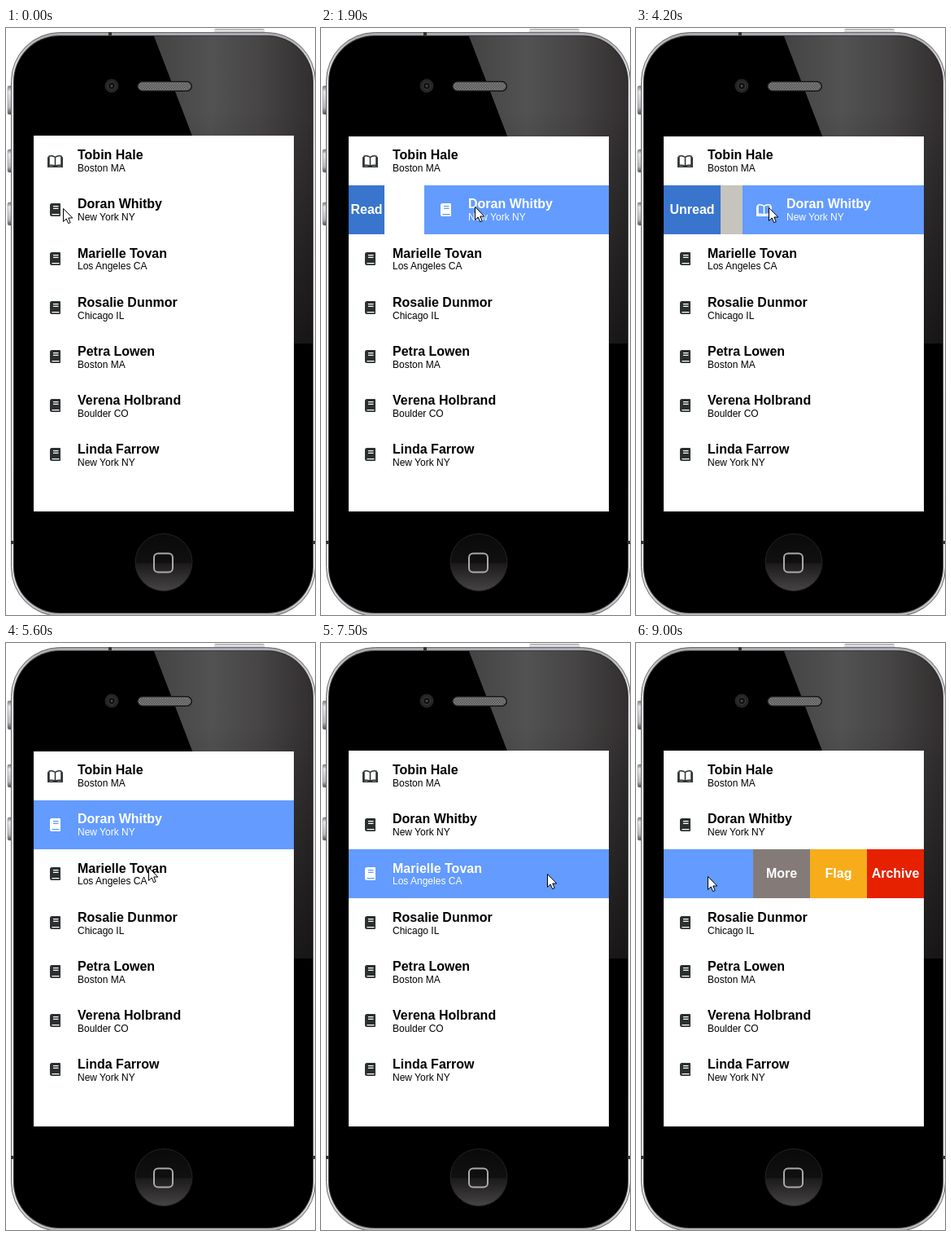
Recreate the animation shown at these times as an HTML page. Size 380 by 720 pixels, loop 9700 ms.

```html
<!DOCTYPE html>
<html lang="en">
<head>
<meta charset="utf-8">
<title>Swipe list</title>
<style>
  html, body { margin: 0; width: 100%; height: 100%; overflow: hidden; background: #fff; }
  svg { display: block; }
  text { font-family: "Liberation Sans", Arial, sans-serif; }
  .name, .label { font-size: 16px; font-weight: bold; }
  .city { font-size: 12px; }
  .label { fill: #fff; text-anchor: middle; }
  .row { --bg: #fff; --ink: #000; --icon: #2b3031; }
  .row rect { fill: var(--bg); }
  .row text { fill: var(--ink); }
  .closed { fill: var(--icon); fill-rule: evenodd; }
  .open { fill: none; stroke: var(--icon); stroke-width: 1.5; }
</style>
</head>
<body>
<svg width="380" height="720" viewBox="0 0 380 720">
  <defs>
    <linearGradient id="rim" x1="0" x2="0" y1="0" y2="1">
      <stop offset="0" stop-color="#a9a8ac"/><stop offset=".06" stop-color="#dcdbdf"/>
      <stop offset=".5" stop-color="#efeef1"/><stop offset=".94" stop-color="#e2e1e5"/>
      <stop offset="1" stop-color="#b5b4b8"/>
    </linearGradient>
    <linearGradient id="key" x1="0" x2="0" y1="0" y2="1">
      <stop offset="0" stop-color="#77777b"/><stop offset=".2" stop-color="#e6e6e9"/>
      <stop offset=".75" stop-color="#b9b9bd"/><stop offset="1" stop-color="#4b4b4f"/>
    </linearGradient>
    <linearGradient id="gloss" gradientUnits="userSpaceOnUse" x1="185" y1="0" x2="378" y2="0">
      <stop offset="0" stop-color="#444"/><stop offset=".35" stop-color="#525252"/>
      <stop offset=".65" stop-color="#474545"/><stop offset="1" stop-color="#322e2f"/>
    </linearGradient>
    <linearGradient id="fade" gradientUnits="userSpaceOnUse" x1="0" y1="100" x2="0" y2="387">
      <stop offset="0" stop-opacity="0"/><stop offset="1" stop-opacity=".55"/>
    </linearGradient>
    <linearGradient id="home" x1="0" x2="0" y1="0" y2="1">
      <stop offset="0" stop-color="#0a0a0a"/><stop offset=".5" stop-color="#101010"/>
      <stop offset=".52" stop-color="#1c1a1b"/><stop offset="1" stop-color="#474446"/>
    </linearGradient>
    <pattern id="mesh" width="3" height="3" patternUnits="userSpaceOnUse">
      <rect width="3" height="3" fill="#858585"/>
      <path d="M0 0h1.5v1.5h-1.5zM1.5 1.5h1.5v1.5h-1.5z" fill="#4f4f4f"/>
    </pattern>
    <clipPath id="face"><rect x="10" y="10" width="367" height="707" rx="56"/></clipPath>
    <clipPath id="screen"><rect x="34" y="132" width="320" height="461"/></clipPath>
  </defs>

  <g id="phone">
    <rect x="256" y="1" width="62" height="8" rx="2" fill="url(#key)"/>
    <g fill="url(#key)" stroke="#8b8b90" stroke-width=".6">
      <rect x="2" y="71" width="7" height="35" rx="2"/>
      <rect x="2" y="149" width="7" height="28" rx="2"/>
      <rect x="2" y="214" width="7" height="28" rx="2"/>
    </g>
    <rect x="6.5" y="5.5" width="374" height="716" rx="60" fill="url(#rim)" stroke="#69686c"/>
    <rect x="9" y="9" width="369" height="709" rx="57" fill="#3b3b3d"/>
    <rect x="10" y="10" width="367" height="707" rx="56"/>
    <g clip-path="url(#face)">
      <path id="shine" d="M182 10H380V387H327Z" fill="url(#gloss)"/>
      <path d="M182 10H380V387H327Z" fill="url(#fade)"/>
    </g>
    <path d="M6 631h4M377 631h3M126 7h4" stroke="#333" stroke-width="4"/>
    <circle cx="130" cy="71" r="8.5" fill="#252525"/>
    <circle cx="130" cy="71" r="4.5" fill="#111" stroke="#414141"/>
    <circle cx="130" cy="71" r="1.5" fill="#4a4a50"/>
    <rect x="161" y="65" width="68" height="13" rx="6.5" fill="#151515"/>
    <rect x="163" y="67" width="64" height="9" rx="4.5" fill="url(#mesh)" stroke="#777"/>
    <circle cx="194" cy="655.5" r="35" fill="url(#home)" stroke="#252324"/>
    <rect x="182" y="644.5" width="23" height="23" rx="5" fill="none" stroke="#aaa" stroke-width="2"/>
  </g>

  <g clip-path="url(#screen)">
    <rect x="34" y="133" width="320" height="460" fill="#fff"/>
    <rect id="edge" x="34" y="132" width="320" height="1" fill="#fff"/>
    <g id="list"></g>
  </g>
  <path id="cursor" d="M.5 .5V16.5L4.2 13L6.7 18.7L9.2 17.6L6.8 12H11.8Z" fill="#fff" stroke="#000"/>
</svg>

<script>
const LOOP = 9700, LEFT = 34, RIGHT = 354, TOP = 133, ROW = 60, BUTTON = 70;
const BLUE = '#639bff', PRESSED = '#94bbf9', GAP = '#c5c4bd';
const people = [
  ['Tobin Hale', 'Boston MA'], ['Doran Whitby', 'New York NY'],
  ['Marielle Tovan', 'Los Angeles CA'], ['Rosalie Dunmor', 'Chicago IL'],
  ['Petra Lowen', 'Boston MA'], ['Verena Holbrand', 'Boulder CO'],
  ['Linda Farrow', 'New York NY']
];
// Pointer path: time, x, y
const path = [
  [0, 70, 221], [100, 71, 221], [900, 71, 221], [1800, 189, 219], [2600, 189, 219],
  [3300, 63, 220], [3400, 64, 220], [4200, 163, 220], [4400, 175, 221], [5200, 175, 221],
  [5600, 175, 275], [5900, 227, 282], [6400, 227, 282], [6900, 310, 281], [7000, 310, 281],
  [7100, 309, 281], [7200, 309, 281], [7500, 278, 283], [8200, 97, 286], [8500, 89, 286],
  [8600, 89, 286], [8700, 88, 286], [LOOP, 88, 286]
];
const list = document.getElementById('list');
const edge = document.getElementById('edge');
const cursor = document.getElementById('cursor');

function add(parent, tag, attrs, text = '') {
  const el = document.createElementNS('http://www.w3.org/2000/svg', tag);
  set(el, attrs);
  el.textContent = text;
  return parent.appendChild(el);
}
function set(el, attrs) {
  for (const key in attrs) el.setAttribute(key, attrs[key]);
}
const clamp = v => Math.min(1, Math.max(0, v));
const ease = v => (1 - Math.cos(Math.PI * clamp(v))) / 2;

function makeButton(index, label, color) {
  const box = add(list, 'svg', { y: TOP + ROW * index, height: ROW, width: 0 });
  add(box, 'rect', { width: '100%', height: ROW, fill: color });
  const text = add(box, 'text', { class: 'label', x: '50%', y: 35 }, label);
  return { box, text };
}

const gaps = [1, 2].map(i =>
  add(list, 'rect', { x: LEFT, y: TOP + ROW * i, width: RIGHT - LEFT, height: ROW }));

const rows = people.map(([name, city], i) => {
  const g = add(list, 'g', { class: 'row' });
  const top = TOP + ROW * i;
  add(g, 'rect', { x: LEFT, y: top, width: RIGHT - LEFT, height: ROW });
  const closed = add(g, 'path', { class: 'closed', transform: `translate(54 ${top + 22})`,
    d: 'M2.5 0H12Q13 0 13 1V15Q13 16 12 16H2.5Q0 16 0 13.5V2.5Q0 0 2.5 0ZM4 3h6.5v1.2h-6.5zM4 5.8h6.5v1.2h-6.5zM2.5 13h9v1.3h-9z' });
  const open = add(g, 'path', { class: 'open', transform: `translate(51 ${top + 23})`,
    d: 'M9.5 2.5Q6 0 2 1.2V12.5Q6 11.5 9.5 13.5Q13 11.5 17 12.5V1.2Q13 0 9.5 2.5V14M2 3H.8V14.2H18.2V3H17' });
  add(g, 'text', { class: 'name', x: 88, y: Math.round(161.1 + 60.2 * i) }, name);
  add(g, 'text', { class: 'city', x: 88, y: Math.round(176 + 60.2 * i) }, city);
  return { g, closed, open };
});

const mark = makeButton(1, 'Read', '#3974cd');
const actions = [['More', '#847b79'], ['Flag', '#f7ac1a'], ['Archive', '#e62100']]
  .map(([label, color]) => makeButton(2, label, color));

function pointerAt(t) {
  const i = path.findIndex(p => p[0] > t) - 1;
  const [t0, x0, y0] = path[i], [t1, x1, y1] = path[i + 1];
  const k = (t - t0) / (t1 - t0);
  return [Math.round(x0 + (x1 - x0) * k), Math.round(y0 + (y1 - y0) * k)];
}

function setRow(i, color, shift, isOpen) {
  const { g, closed, open } = rows[i];
  g.setAttribute('transform', `translate(${shift} 0)`);
  g.style.setProperty('--bg', color || '#fff');
  g.style.setProperty('--ink', color ? '#fff' : '#000');
  g.style.setProperty('--icon', color ? '#fff' : '#2b3031');
  closed.style.display = isOpen ? 'none' : '';
  open.style.display = isOpen ? '' : 'none';
}

// Right swipe: follow the pointer, then ease back; the button closes faster than the row.
function rightSwipe(t, x, start, end, grip, reach, duration) {
  if (t < start) return { shift: 0, width: 0 };
  if (t <= end) {
    const shift = x - grip > 12 ? x - grip : 0;
    return { shift, width: Math.min(BUTTON, shift), dragging: true };
  }
  const elapsed = t - end + 20;
  return {
    shift: Math.round(reach * (1 - ease(elapsed / duration))),
    width: Math.round(BUTTON * (1 - ease(elapsed / (duration * .69))))
  };
}

function leftShift(t, x) {
  if (t < 7300) return 0;
  if (t <= 8800) return 309 - x > 32 ? 309 - x : 0;
  return Math.round(221 - 11 * ease((t - 8800) / 200));
}

function draw(time) {
  const t = Math.floor(time % LOOP / 100) * 100;
  const [x, y] = pointerAt(t);
  cursor.setAttribute('transform', `translate(${x} ${y})`);
  edge.style.display = t >= 900 && t < 6200 ? 'none' : '';

  const swipe = t < 3400
    ? rightSwipe(t, x, 900, 1800, 74, 115, 420)
    : rightSwipe(t, x, 3500, 4400, 66, 109, 320);
  const firstColor = t < 100 || t >= 6200 ? '' : t < 1000 ? PRESSED : BLUE;
  setRow(1, firstColor, swipe.shift, t >= 2200 && t < 4700);
  set(gaps[0], { fill: swipe.dragging ? GAP : '#fff' });
  set(mark.box, { x: LEFT, width: swipe.width });
  mark.text.textContent = t < 3400 ? 'Read' : 'Unread';

  const shift = leftShift(t, x);
  setRow(2, t < 5900 ? '' : t < 6200 ? PRESSED : BLUE, -shift, false);
  set(gaps[1], { fill: shift ? GAP : '#fff' });
  const width = Math.min(BUTTON, shift / 3);
  actions.forEach(({ box }, i) => set(box, { x: RIGHT - width * (3 - i), width }));
}

rows.forEach((row, i) => setRow(i, '', 0, i === 0));
const begin = performance.now();
function tick() {
  draw(performance.now() - begin);
  requestAnimationFrame(tick);
}
tick();
</script>
</body>
</html>
```
